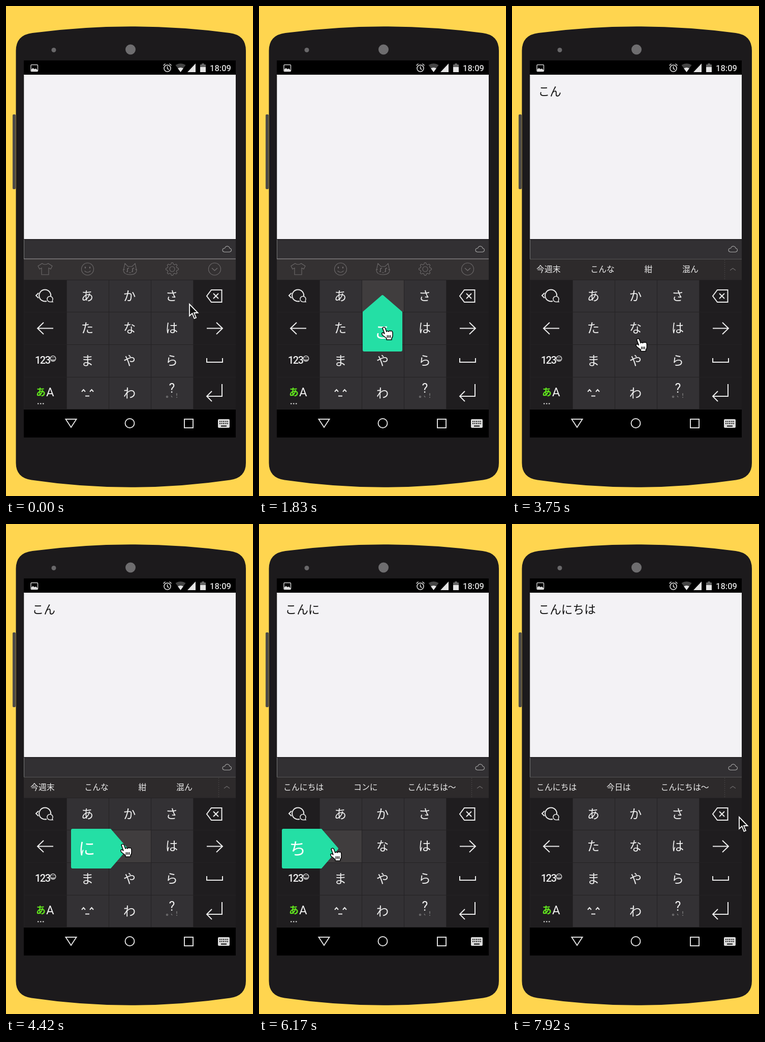
An HTML page that plays this animation: 486 px wide and 963 px high, repeating every 8000 ms.

```html
<!DOCTYPE html>
<html lang="ja">
<head>
<meta charset="utf-8">
<title>Flick keyboard</title>
<style>
  html, body { margin: 0; width: 100%; height: 100%; overflow: hidden; background: #ffd54f; }
  svg { display: block; width: 100%; height: 100%; }
  text { font-family: "Noto Sans CJK JP", "Noto Sans CJK", sans-serif; }
  .latin { font-family: Roboto, sans-serif; }
  .line { fill: none; stroke: #ececec; stroke-width: 2; }
  .thin { fill: none; stroke: #6d6a6b; stroke-width: 1.1; }
  .mid { text-anchor: middle; }
</style>
</head>
<body>
<svg viewBox="0 0 486 963">
  <rect width="486" height="963" fill="#ffd54f"/>
  <rect x="13" y="213" width="6" height="147" rx="2" fill="#4c4a48"/>
  <path fill="#1c1a1c" d="M19.500 88Q19.500 57 52 53Q245 27.500 440 53Q472 57 472 88V898Q472 927 441 931.500Q245 960 50 931.500Q19.500 927 19.500 898Z"/>
  <circle cx="94" cy="86.500" r="4.500" fill="#69686a"/>
  <circle cx="245" cy="85.500" r="10" fill="#6e6d6f"/>

  <!-- status bar -->
  <rect x="35" y="107" width="417" height="28"/>
  <rect x="49" y="115.500" width="13.500" height="13" rx="1.500" fill="none" stroke="#ccc" stroke-width="1.500"/>
  <path fill="#ddd" d="M50 128v-4l3-2 3 2 3-1 3 3v2z"/>
  <g class="line" style="stroke:#ddd;stroke-width:1.600">
    <circle cx="317.500" cy="122.500" r="6.500"/>
    <path d="M317.500 118.500v4.500l3 2M309.500 117l4-3.500M325.500 117l-4-3.500"/>
  </g>
  <path fill="#454545" d="M333.500 116Q343.500 110 353.500 116L343.500 130Z"/>
  <path fill="#e4e4e4" d="M338 122.500q5.500-3 11 0L343.500 130Z"/>
  <path fill="#e4e4e4" d="M357 130L373 113V130Z"/>
  <path fill="#666" d="M385 113h5v2h3v6h-11v-6h3z"/>
  <rect x="382" y="120" width="11" height="10" fill="#e4e4e4"/>
  <text class="latin" x="401" y="128" font-size="16.500" font-weight="500" fill="#ddd">18:09</text>

  <!-- editor -->
  <rect x="35" y="135" width="417" height="323" fill="#f3f2f5"/>
  <path d="M35.500 136V458" stroke="#bbb"/>
  <text id="typed" x="51.500" y="175.500" font-size="22.700" fill="#111"></text>
  <rect x="35" y="458" width="417" height="39" fill="#323033"/>
  <path d="M35 459H452" stroke="#252326" stroke-width="2"/>
  <path d="M35.500 459V497" stroke="#777"/>
  <path class="thin" style="stroke:#aaa" d="M430 483.500q-4-.5-4-4 .5-3.500 4.500-3.500 1.500-4 5-4 4 .5 4.500 4 3.500.5 3.500 4-.5 3-4 3.500z"/>

  <!-- toolbar or candidates -->
  <g id="tools">
    <rect x="35" y="497" width="417" height="41" fill="#343132"/>
    <g class="thin">
      <path d="M71 506q6 4 12 0l8 5-3 6-4-2v13H70V515l-4 2-3-6z"/>
      <circle cx="160.500" cy="517" r="12"/>
      <path d="M154.500 520.500q6 6 12 0"/>
      <path stroke-width="2.500" stroke-linecap="round" d="M156 513.500v1M165 513.500v1"/>
      <path d="M234 506l6 6h8l6-6 3 14q-1 8-13 8t-13-8zM242 524h4M230 518h4M254 518h4"/>
      <path stroke-width="1.600" d="M237 522h2v-6l3-1M247 522h2v-6l3-1"/>
      <circle cx="327" cy="517" r="5"/>
      <path id="gear"/>
      <circle cx="410.500" cy="517" r="12"/>
      <path stroke-width="1.500" d="M405 515l5.500 5 5.500-5"/>
    </g>
    <path d="M35 497H452" stroke="#a5a3a5"/>
  </g>
  <g id="candidates">
    <rect x="35" y="497" width="417" height="41" fill="#2d2a2b"/>
    <path d="M35 497.500H452" stroke="#555"/>
    <g id="words" font-size="15.900" fill="#eee"></g>
    <path d="M418.500 499V538" stroke="#464344" stroke-dasharray="2 2"/>
    <path class="thin" d="M429 519.500l5.500-4 5.500 4"/>
  </g>

  <!-- keyboard -->
  <rect x="35" y="538" width="417" height="255" fill="#242224"/>
  <g id="keys"></g>
  <g class="line">
    <path d="M64 564l-5 5 5 5M80 580A11.500 11.500 0 1 1 88 571"/>
    <path stroke-width="1.500" d="M91 580q1-2 1-4a5.500 5.500 0 1 0-5.500 5.500h5.500z"/>
    <path d="M93 633.500H62M74 622L62 633.500 74 645"/>
    <path d="M395 633.500H426M414 622L426 633.500 414 645"/>
    <path d="M404 558H424.500V582H404L395 570ZM408 565l10 10M418 565l-10 10"/>
    <path d="M395 692v8h31v-8"/>
    <path d="M425 743V767H395M405 757L395 767 405 777"/>
    <path d="M149 758l3.500-4 3.500 4M165 758l3.500-4 3.500 4M156 766.500h8"/>
    <g style="stroke-width:1.300">
      <circle cx="92.500" cy="693" r="5.300"/>
      <path d="M89.500 694.500q3 3.500 6 0M91 690.500v1.500M94 690.500v1.500"/>
    </g>
  </g>
  <text class="latin" x="57" y="703" font-size="20" letter-spacing="-1.500" font-weight="500" fill="#eee">123</text>
  <text x="59" y="766" font-size="19" font-weight="700" fill="#61e51d">あ</text>
  <text class="latin" x="79" y="767" font-size="24" fill="#eee">A</text>
  <path d="M62 781.500h12.500" stroke="#ddd" stroke-width="2" stroke-dasharray="2.500 2.500"/>
  <text class="latin mid" x="326.500" y="759.500" font-size="25" fill="#eee">?</text>
  <g fill="none" stroke="#888" stroke-width="1.200">
    <circle cx="317" cy="768" r="1.500"/>
    <path d="M325 766l2 3M336 761v5M336 768v2"/>
  </g>

  <!-- navigation bar -->
  <rect x="35" y="793" width="417" height="55"/>
  <g class="line" style="stroke:#ddd">
    <path d="M117.500 812H138.500L128 828Z"/>
    <circle cx="243.500" cy="820" r="9"/>
    <rect x="351" y="812" width="17" height="17"/>
  </g>
  <rect x="417" y="812" width="23" height="17" rx="2" fill="#ddd"/>
  <path d="M420 816.500h18M420 820.500h18" stroke="#000" stroke-width="2" stroke-dasharray="2 1.500"/>
  <path d="M423 825.500h11" stroke="#000" stroke-width="2"/>

  <g id="popup">
    <path id="bubble" fill="#24dfa5" d="M-2 2Q0 0 2 2L39 34V109q0 3-3 3H-36q-3 0-3-3V34Z"/>
    <text id="bubbleText" class="mid" font-size="33" font-weight="300" fill="#fff"></text>
  </g>

  <path id="arrow" fill="#111" stroke="#fff" stroke-width="1.800" d="M0 0V23L5.500 18 9.500 28 13 26.500 9 17H16.500Z"/>
  <g id="hand" stroke="#000" stroke-width="1.500" stroke-linejoin="round">
    <path fill="#fff" d="M-4 2Q-2-1 1 1L4 9Q6 6 8 9 10 6 12 8 15 6 16 11V17Q16 20 14 22V25H4V22L-4 16Q-7 11-3 11L0 13Z"/>
    <path d="M5.500 16v5M8.500 16v5M11.500 16v5"/>
  </g>
</svg>
<script>
const LOOP = 8000;
const $ = id => document.getElementById(id);
const make = (parent, tag, attrs, text = '') => {
  const node = document.createElementNS('http://www.w3.org/2000/svg', tag);
  for (const name in attrs) node.setAttribute(name, attrs[name]);
  node.textContent = text;
  return parent.appendChild(node);
};
const show = (node, on) => node.setAttribute('display', on ? 'inline' : 'none');
const place = (node, x, y, angle = 0) =>
  node.setAttribute('transform', `translate(${x} ${y}) rotate(${angle})`);

// Key grid: the outer columns hold the dark function keys
const columns = [36, 120, 203, 286, 369, 453];
const rows = [539, 602, 666, 730, 793];
const keys = {};
['#あかさ#', '#たなは#', '#まやら#', '# わ #'].forEach((line, r) => {
  [...line].forEach((label, c) => {
    const x = columns[c], y = rows[r];
    const width = columns[c + 1] - x - 1, height = rows[r + 1] - y - 1;
    const fill = label === '#' ? '#1f1d1f' : '#333134';
    const cap = make($('keys'), 'rect', { x, y, width, height, fill });
    if (label === '#' || label === ' ') return;
    const cx = x + width / 2 - 1, cy = y + height / 2;
    const glyph = make($('keys'), 'text',
      { x: cx, y: cy + 8.5, 'font-size': 24.5, fill: '#eee', class: 'mid' }, label);
    keys[label] = { cap, glyph, cx, cy };
  });
});

// Gear outline with eight teeth
$('gear').setAttribute('d', 'M' + Array.from({ length: 32 }, (_, i) => {
  const angle = (i - 0.5) * Math.PI / 16, radius = i % 4 < 2 ? 12.5 : 9.5;
  return `${327 + radius * Math.cos(angle)} ${517 + radius * Math.sin(angle)}`;
}).join('L') + 'Z');

// Bubble directions: turn, tip offset from the key centre, character offset
const down = { angle: 0, tip: [0, -3], text: [0, 71] };
const up = { angle: 180, tip: [0, 0], text: [0, -76] };
const left = { angle: 90, tip: [-3, 4.5], text: [-84, 5] };

const strokes = [
  { press: 1400, flick: 1580, release: 2080, key: 'か', char: 'こ', way: down },
  { press: 2740, flick: 2860, release: 3250, key: 'わ', char: 'ん', way: up },
  { press: 4080, flick: 4220, release: 4680, key: 'な', char: 'に', way: left },
  { press: 5620, flick: 5780, release: 6180, key: 'た', char: 'ち', way: left },
  { press: 6910, flick: Infinity, release: 7080, key: 'は', char: 'は' }
];
const candidates = [
  [],
  ['ございます', 'ご近所', 'ご飯は', 'こ'],
  ['今週末', 'こんな', '紺', '混ん'],
  ['こんにちは', 'コンに', 'こんにちは〜'],
  ['こんにちは', '今日', 'こんにちは〜'],
  ['こんにちは', '今日は', 'こんにちは〜']
];

// Pointer path: time, x, y
const path = [
  [0, 361, 586], [500, 361, 586], [1250, 246, 576], [1450, 246, 576],
  [1830, 247, 631], [2150, 247, 633], [2680, 246, 768], [2780, 246, 768],
  [3000, 247, 741], [3300, 247, 735], [3950, 250, 630], [4120, 250, 630],
  [4420, 231, 629], [4750, 222, 629], [5350, 170, 637], [5660, 170, 637],
  [5950, 146, 637], [6220, 146, 637], [6780, 325, 635], [7150, 325, 635],
  [7700, 447, 576], [8000, 447, 576]
];
function pointerAt(t) {
  const i = path.findIndex(p => p[0] > t);
  const [t0, x0, y0] = path[i - 1], [t1, x1, y1] = path[i];
  const u = (t - t0) / (t1 - t0), eased = u * u * (3 - 2 * u);
  return [x0 + (x1 - x0) * eased, y0 + (y1 - y0) * eased];
}

let shownCount = -1;
function showCount(count) {
  if (count === shownCount) return;
  shownCount = count;
  $('typed').textContent = strokes.slice(0, count).map(s => s.char).join('');
  show($('tools'), count === 0);
  show($('candidates'), count > 0);
  $('words').replaceChildren();
  let x = 48;
  for (const word of candidates[count]) {
    make($('words'), 'text', { x, y: 523 }, word);
    x += word.length * 15.9 + 58.6;
  }
}

function draw(t) {
  showCount(strokes.filter(s => t >= s.release).length);

  const active = strokes.find(s => t >= s.press && t < s.release);
  const flicked = !!active && t >= active.flick;
  for (const label in keys) {
    const pressed = !!active && active.key === label;
    keys[label].cap.setAttribute('fill', pressed ? '#403d3e' : '#333134');
    show(keys[label].glyph, !(pressed && flicked));
  }
  show($('popup'), flicked);
  if (flicked) {
    const { cx, cy } = keys[active.key];
    const { angle, tip, text } = active.way;
    place($('popup'), cx, cy);
    place($('bubble'), tip[0], tip[1], angle);
    $('bubbleText').textContent = active.char;
    place($('bubbleText'), text[0], text[1] + 11.5);
  }

  const [x, y] = pointerAt(t);
  const overKeys = x < 345;
  show($('hand'), overKeys);
  show($('arrow'), !overKeys);
  place(overKeys ? $('hand') : $('arrow'), x, y);
}

const start = performance.now();
function tick() {
  draw((performance.now() - start) % LOOP);
  requestAnimationFrame(tick);
}
tick();
</script>
</body>
</html>
```
